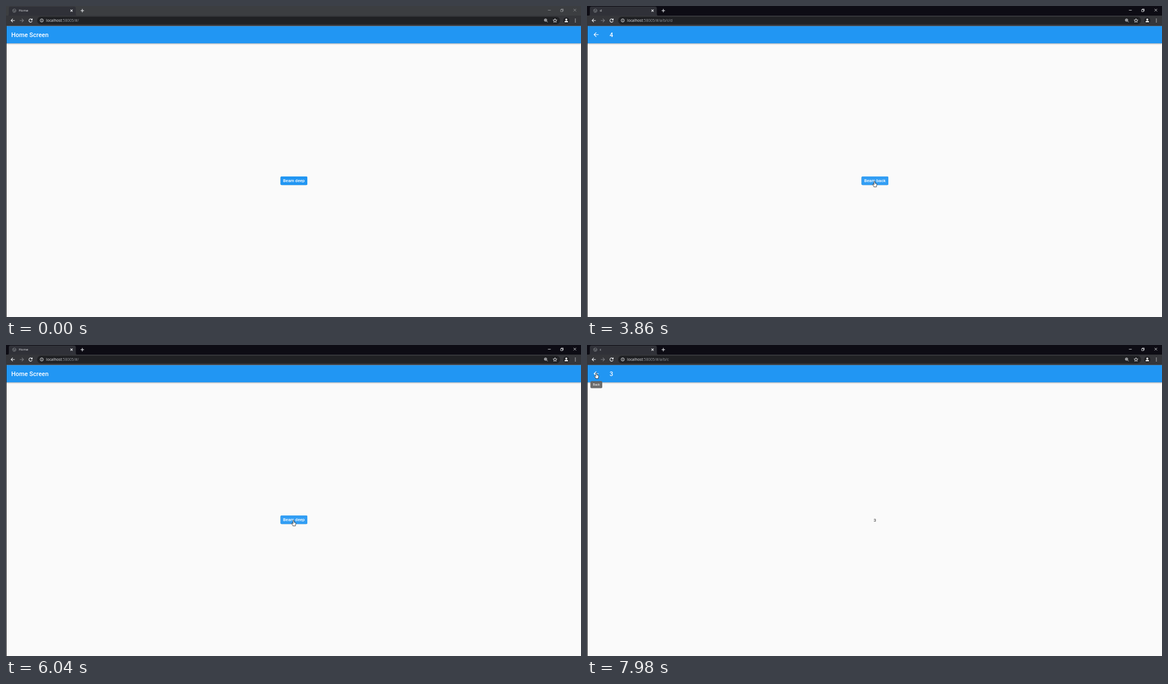
An HTML page for the animation above (8 s loop, 1017x551 px).

```html
<!DOCTYPE html>
<html lang="en">
<head>
<meta charset="utf-8">
<title>Page transitions</title>
<style>
html, body { margin: 0; width: 100%; height: 100%; overflow: hidden; background: #fafafa; }
svg { display: block; width: 1017px; height: 551px; }
text { font-family: Roboto, sans-serif; white-space: pre; }
.ui { font-family: "Open Sans", "Noto Sans", sans-serif; }
.title { font-size: 10.93px; font-weight: 500; fill: #fff; }
.label { font-size: 7.64px; font-weight: 500; fill: #fff; text-anchor: middle; }
.body { font-size: 7.64px; fill: #222; text-anchor: middle; }
.bar { fill: #2196f3; filter: drop-shadow(0 1.2px 1.2px rgba(0,0,0,.32)); }
.btn { fill: #2196f3; filter: drop-shadow(0 .8px .7px rgba(0,0,0,.35)); }
.line { fill: none; stroke: #e8eaed; stroke-width: 1.1; }
</style>
</head>
<body>
<svg viewBox="0 0 1017 551">
  <g id="pages"></g>
  <g id="tip">
    <rect x="6" y="64" width="21" height="12.5" rx="2" fill="#616161" opacity=".92"/>
    <text x="16.5" y="72.2" font-size="5.46" fill="#fff" text-anchor="middle">Back</text>
  </g>
  <rect y="35" width="1" height="516" fill="#202124"/>

  <rect id="strip" width="1017" height="18"/>
  <path d="M2 17.5Q5 17.5 5 14V4Q5 1 8 1H120Q123.500 1 123.500 4V14Q123.500 17.500 127 17.500Z" fill="#303138"/>
  <rect y="17" width="1017" height="18.500" fill="#35363a"/>
  <rect x="55" y="19" width="925" height="13.500" rx="6.750" fill="#202124"/>
  <g class="line" style="stroke:#85888c;stroke-width:.8">
    <circle cx="14.700" cy="8.300" r="3"/>
    <path d="M12 7.500h2l1 1.500 2.500-1M14 11l.5-2"/>
  </g>
  <text id="tab" class="ui" x="22.500" y="10.300" font-size="5.900" fill="#dfe1e5"></text>
  <path class="line" d="M114 6.300l3.800 3.800M117.800 6.300l-3.800 3.800M132 8.200h6M135 5.200v6"/>
  <g id="winButtons" class="line" style="stroke-width:.8">
    <path d="M958.500 7.500h5M981 6.500h3.500v3.500h-3.500zM982 6.500v-1.200h3.600v3.600h-1.100M1003.800 5l4.600 4.600M1008.400 5l-4.600 4.600"/>
  </g>
  <path class="line" d="M15.500 25.700h-6.500M12 22.700l-3 3 3 3"/>
  <path class="line" style="stroke:#7a7c80" d="M24.500 25.700h6.500M28 22.700l3 3-3 3"/>
  <path class="line" d="M46 24.200a2.900 2.900 0 1 0 .3 2.400M46.400 22.300v2.300h-2.300"/>
  <g class="line" style="stroke-width:.9">
    <circle cx="63.200" cy="25.600" r="2.800"/>
    <path d="M63.200 25.200v2M63.200 23.700v.8"/>
    <circle cx="954.300" cy="25" r="2.200"/>
    <path d="M956 26.700l2 2M953.200 25h2.200M954.300 23.900v2.200"/>
    <path d="M971 22.500l1 2.200 2.400.2-1.800 1.600.5 2.400-2.100-1.300-2.100 1.300.5-2.400-1.800-1.600 2.400-.2z"/>
  </g>
  <circle cx="991" cy="25.700" r="5.500" fill="#202124"/>
  <path d="M988 28.800v-1q0-1.500 3-1.500t3 1.500v1z" fill="#fff"/>
  <circle cx="991" cy="24" r="1.700" fill="#fff"/>
  <g fill="#e8eaed"><circle cx="1007" cy="23.200" r=".75"/><circle cx="1007" cy="25.700" r=".75"/><circle cx="1007" cy="28.200" r=".75"/></g>
  <text class="ui" x="71" y="28" font-size="6.650" fill="#e8eaed">localhost<tspan id="path" fill="#969a9f"></tspan></text>

  <g id="cursor" fill="#fff" stroke="#111" stroke-width=".7" stroke-linejoin="round">
    <path id="hand" d="M-.9.8Q0-.5.9.8V4L3.500 4.700Q4.300 5 4.200 6.200L3.500 9V10.500H-1.200V9.500L-3.400 6.500Q-3.500 5.200-2.300 5.600L-.9 6.800Z"/>
    <path id="arrow" d="M0 0V9L2 7.200 3.300 10 4.700 9.400 3.500 6.600H6.200Z"/>
  </g>
</svg>
<script>
const LOOP = 8000, FADE = 300, RISE = 129;
const PUSH_1 = 2150, POP_ALL = 3964, PUSH_2 = 6080, POP_ONE = 7600;
const ACTIVATE = 2080, TOOLTIP = 7120;
// time, x, y of the pointer tip
const trail = [
  [1760, 1030, 335], [2000, 507.5, 305], [3420, 507.5, 305], [3620, 508.5, 310],
  [6680, 508.5, 310], [6980, 38, 60.5], [7140, 16.5, 49]
];

const el = id => document.getElementById(id);
const clamp = v => Math.min(1, Math.max(0, v));
const show = (node, on) => node.style.display = on ? "" : "none";

function bezier(x1, y1, x2, y2) {
  const at = (a, b, s) => 3 * a * s * (1 - s) ** 2 + 3 * b * s * s * (1 - s) + s ** 3;
  return x => {
    let lo = 0, hi = 1;
    for (let i = 0; i < 20; i++) {
      const mid = (lo + hi) / 2;
      if (at(x1, x2, mid) < x) lo = mid; else hi = mid;
    }
    return at(y1, y2, hi);
  };
}
const slide = bezier(.4, 0, .2, 1), fade = bezier(.42, 0, 1, 1);

const button = label => `
  <rect class="btn" x="485.500" y="302" width="47.500" height="15.300" rx="2"/>
  <rect class="hover" x="485.500" y="302" width="47.500" height="15.300" rx="2" fill="#fff"/>
  <text class="label" x="509.200" y="312.400">${label}</text>`;
const number = n => `<text class="body" x="509.200" y="312.600">${n}</text>`;
const back = `<path transform="translate(9.500 44.200) scale(.546)" fill="#fff"
  d="M20 11H7.830l5.590-5.590L12 4l-8 8 8 8 1.410-1.410L7.830 13H20z"/>`;
const page = (title, x, content, icon = "") => `<g>
  <rect y="35.500" width="1017" height="516" fill="#fafafa"/>
  <rect class="bar" y="35.500" width="1017" height="30.600"/>
  ${icon}<text class="title" x="${x}" y="54.700">${title}</text>${content}</g>`;

el("pages").innerHTML = page("Home Screen", 9.3, button("Beam deep")) +
  [1, 2, 3, 4].map(n => page(n, 40, n < 4 ? number(n) : button("Beam back"), back)).join("");
const pages = [...el("pages").children];
const hovers = document.querySelectorAll(".hover");

function place(node, v) {
  show(node, v > 0);
  node.setAttribute("transform", `translate(0 ${RISE * (1 - slide(v))})`);
  node.setAttribute("opacity", v < 1 ? fade(v) : 1);
}

function pointer(t) {
  let i = trail.findIndex(p => p[0] > t);
  if (i < 0) return trail[trail.length - 1].slice(1);
  if (!i) return trail[0].slice(1);
  const [t0, x0, y0] = trail[i - 1], [t1, x1, y1] = trail[i];
  const p = (t - t0) / (t1 - t0), k = p * p * (3 - 2 * p);
  return [x0 + (x1 - x0) * k, y0 + (y1 - y0) * k];
}

function draw(t) {
  const since = start => clamp((t - start) / FADE);
  const top = t < POP_ALL ? since(PUSH_1)
    : t < PUSH_2 ? 1 - since(POP_ALL)
    : t < POP_ONE ? since(PUSH_2) : 1 - since(POP_ONE);
  // The stacked pages leave together when beaming back.
  const lower = t >= POP_ONE ? 1 : t >= POP_ALL && t < PUSH_2 ? top : 0;
  pages.slice(1, 4).forEach(p => place(p, lower));
  place(pages[4], top);

  const name = t >= POP_ONE ? "c"
    : t >= PUSH_2 || t >= PUSH_1 && t < POP_ALL ? "d" : "Home";
  el("tab").textContent = name;
  el("path").textContent = ":58005/#/" + { Home: "", c: "a/b/c", d: "a/b/c/d" }[name];

  const active = t >= ACTIVATE;
  el("strip").setAttribute("fill", active ? "#0d0c14" : "#3c3e41");
  el("winButtons").setAttribute("opacity", active ? 1 : .5);

  const [x, y] = pointer(t);
  const onButton = x > 485 && x < 533 && y > 301 && y < 318;
  const onBack = x < 31 && y > 36 && y < 66;
  el("cursor").setAttribute("transform", `translate(${x} ${y})`);
  show(el("hand"), onButton || onBack);
  show(el("arrow"), !onButton && !onBack);
  hovers.forEach(h => h.setAttribute("opacity", onButton ? .08 : 0));
  el("tip").setAttribute("opacity", clamp((t - TOOLTIP) / 150));
}

function tick() {
  draw(performance.now() % LOOP);
  requestAnimationFrame(tick);
}
tick();
</script>
</body>
</html>
```
